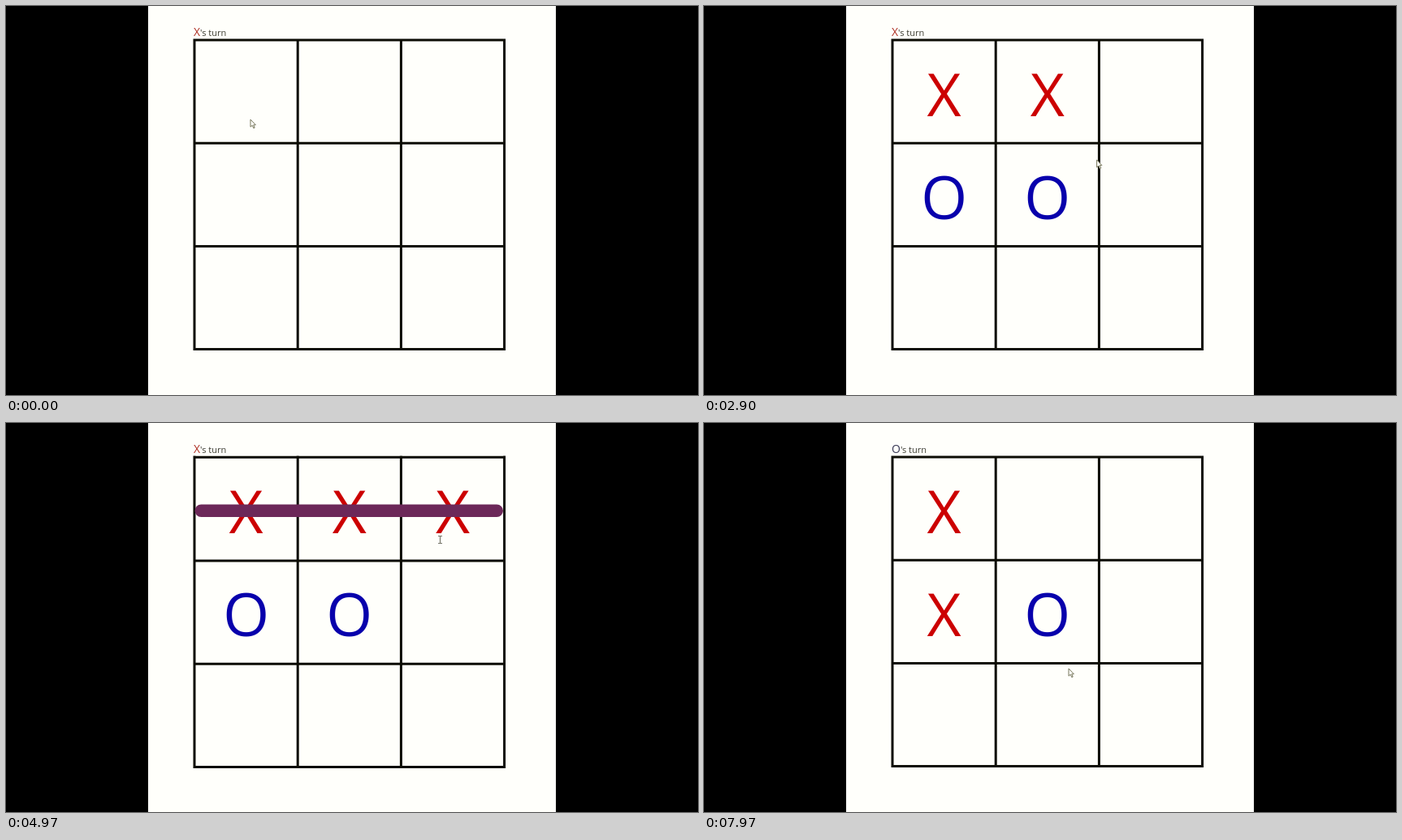
These frames come from a looping animation (852 px wide and 480 px high, 8000 ms). An HTML page:

```html
<!DOCTYPE html>
<html lang="en">
<head>
<meta charset="utf-8">
<title>Noughts and crosses</title>
<style>
  html, body { margin: 0; width: 100%; height: 100%; overflow: hidden; background: #000; }
  svg { display: block; width: 100vw; height: 100vh; }
  text { font-family: "Open Sans", "Noto Sans", sans-serif; }
  .mark { font-size: 73px; text-anchor: middle; }
  .player { font-size: 14px; }
  .turn { font-size: 11px; fill: #3c3c32; }
  .grid { fill: none; stroke: #0c0c04; stroke-width: 3; }
</style>
</head>
<body>
<svg viewBox="0 0 852 480">
  <rect width="852" height="480" fill="#000"/>
  <rect x="175" width="502" height="480" fill="#fffffb"/>
  <text x="231" y="37"><tspan id="player" class="player">X</tspan><tspan class="turn">'s turn</tspan></text>
  <path id="grid" class="grid"/>
  <g id="marks"></g>
  <rect id="bar" x="232.5" y="100.5" height="15.5" rx="7.75" fill="#6c2859"/>
  <path id="arrow" d="M0 0V9.2L2.2 7.3 3.8 10.8 5.2 10.2 3.7 6.8H6.4Z" fill="#fffffb" stroke="#77775c"/>
  <path id="beam" d="M-2.5 -4.5H2.5M0 -4.5V4.5M-2.5 4.5H2.5" fill="none" stroke="#77776a" stroke-width="1.2"/>
</svg>
<script>
const LOOP = 8000, FADE = 400, CELL = 127.2, LEFT = 232, TOP = 42;
const RESET = 5030, WIN = 3130, WIN_TIME = 1000;
const BLUE = [8, 0, 172], RED = [204, 0, 0];
const $ = id => document.getElementById(id);

// placed at, cell, player
const moves = [
  [430, 0, 'X'], [1350, 3, 'O'], [1830, 1, 'X'], [2650, 4, 'O'], [3100, 2, 'X'],
  [5070, 0, 'X'], [6560, 4, 'O'], [7320, 3, 'X']
].map(([start, cell, player]) => ({
  start, player,
  end: start < RESET ? RESET : LOOP,
  x: LEFT + CELL * (cell % 3 + 0.5),
  y: 136 + CELL * Math.floor(cell / 3)
}));

// time, x, y
const path = [
  [0, 301, 140], [430, 304, 138], [1070, 320, 140], [1310, 315, 226],
  [1640, 316, 230], [1820, 386, 147], [2030, 400, 137], [2500, 449, 229],
  [2780, 446, 224], [3060, 533, 145], [3430, 535.5, 143.5], [5029, 534.5, 144],
  [RESET, 302, 128], [5800, 302, 128], [5830, 341, 120], [5970, 400, 131],
  [6230, 400, 131], [6560, 438, 238], [7100, 438, 240], [7320, 306, 239],
  [7440, 314, 241], [7730, 448, 281], [7945, 448, 281], [7970, 449, 303], [LOOP, 449, 303]
];

for (const m of moves) {
  m.el = document.createElementNS('http://www.w3.org/2000/svg', 'text');
  m.el.setAttribute('class', 'mark');
  m.el.setAttribute('x', m.x);
  m.el.setAttribute('y', m.y);
  m.el.textContent = m.player;
  $('marks').append(m.el);
}

const clamp = v => Math.max(0, Math.min(1, v));
const mix = (a, b, k) => a + (b - a) * k;
const show = (el, on) => el.setAttribute('visibility', on ? 'visible' : 'hidden');
const placed = (m, t) => t >= m.start && t < m.end;

function gridPath(shift) {
  let d = '';
  for (let i = 0; i < 4; i++) {
    const x = LEFT + i * CELL, y = TOP + i * CELL + shift * (i ? 0.8 : 0.2);
    d += `M${x} ${TOP - 1.5}V${TOP + 3 * CELL + 1.5 + shift * 0.8}M${LEFT} ${y}H${LEFT + 3 * CELL}`;
  }
  return d;
}

function drawMarks(t) {
  let turn = 'X';
  for (const m of moves) {
    const on = placed(m, t);
    const k = m.player === 'X' ? clamp((t - m.start) / FADE) : 0;
    show(m.el, on);
    m.el.setAttribute('fill', `rgb(${BLUE.map((c, j) => Math.round(mix(c, RED[j], k)))})`);
    if (on) turn = m.player === 'X' ? 'O' : 'X';
  }
  // the winner keeps the turn
  if (t >= moves[4].start && t < RESET) turn = 'X';
  $('player').textContent = turn;
  $('player').setAttribute('fill', turn === 'X' ? '#b03428' : '#3c3c58');
}

// the pointer turns into a text cursor above a mark
function overMark(m, x, y) {
  const dx = x - m.x, dy = y - m.y;
  const [left, right] = m.player === 'X' ? [-22, 26] : [-28, 28];
  return dx > left && dx < right && dy > -70 && dy < 15;
}

function drawCursor(t) {
  const i = path.findIndex(p => p[0] > t);
  const a = path[i - 1], b = path[i], k = (t - a[0]) / (b[0] - a[0]);
  const x = mix(a[1], b[1], k), y = mix(a[2], b[2], k);
  const text = moves.some(m => placed(m, t) && overMark(m, x, y));
  for (const id of ['arrow', 'beam']) $(id).setAttribute('transform', `translate(${x} ${y})`);
  show($('arrow'), !text);
  show($('beam'), text);
}

function draw(t) {
  const won = t >= WIN && t < RESET;
  $('grid').setAttribute('d', gridPath(won ? 1 : 0));
  show($('bar'), won);
  $('bar').setAttribute('width', 379.5 * clamp((t - WIN) / WIN_TIME));
  drawMarks(t);
  drawCursor(t);
}

const begin = performance.now();
function tick() {
  draw((performance.now() - begin) % LOOP);
  requestAnimationFrame(tick);
}
tick();
</script>
</body>
</html>
```
